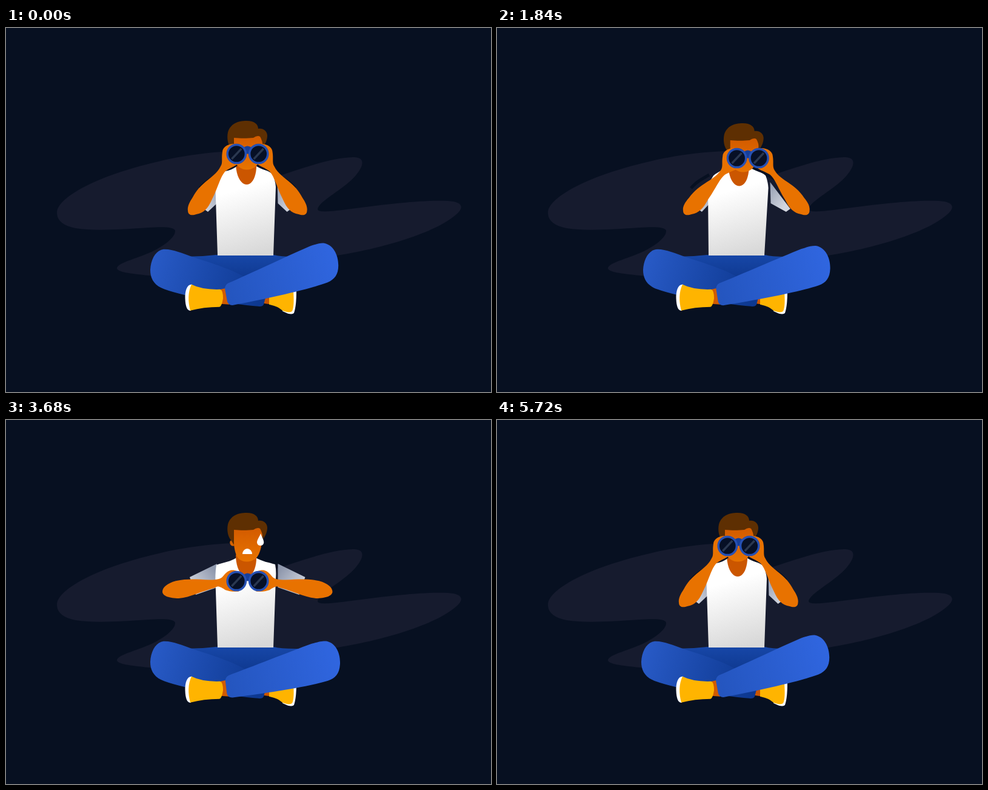
Recreate the animation shown at these times as an HTML page. Size 800 by 600 pixels, loop 5760 ms.

```html
<!DOCTYPE html>
<html lang="en">
<head>
<meta charset="utf-8">
<title>Lookout</title>
<style>
html, body { margin: 0; width: 100%; height: 100%; overflow: hidden; background: #071021; }
svg { display: block; width: 100vw; height: 100vh; }
</style>
</head>
<body>
<svg viewBox="0 0 800 600">
  <defs>
    <linearGradient id="cloth" x1=".4" y1="0" x2=".6" y2="1">
      <stop offset=".25" stop-color="#fff"/><stop offset="1" stop-color="#d8d8d8"/>
    </linearGradient>
    <linearGradient id="cuff" gradientUnits="userSpaceOnUse" x1="346" y1="250" x2="310" y2="280">
      <stop offset="0" stop-color="#8f98ad"/><stop offset="1" stop-color="#d3d7e0"/>
    </linearGradient>
    <linearGradient id="face" x1="0" y1="0" x2="0" y2="1">
      <stop offset="0" stop-color="#d25a00"/><stop offset="1" stop-color="#e87400"/>
    </linearGradient>
    <linearGradient id="hips" x1="0" y1="0" x2="0" y2="1">
      <stop offset="0" stop-color="#1747a8"/><stop offset="1" stop-color="#0c3488"/>
    </linearGradient>
    <linearGradient id="legL" gradientUnits="userSpaceOnUse" x1="240" y1="390" x2="420" y2="440">
      <stop offset="0" stop-color="#285ac6"/><stop offset="1" stop-color="#0d3890"/>
    </linearGradient>
    <linearGradient id="legR" gradientUnits="userSpaceOnUse" x1="362" y1="440" x2="548" y2="375">
      <stop offset="0" stop-color="#2455be"/><stop offset="1" stop-color="#3066e0"/>
    </linearGradient>
    <g id="lens">
      <circle r="15.1" fill="#071026" stroke="#2650b3" stroke-width="3.5"/>
      <path d="M-8 8.5L8 -8.5" stroke="#2b3850" stroke-width="3.4"/>
    </g>
  </defs>

  <path fill="#161b2e" d="M84 304C84 282 142 244 260 218C300 209 345 204 375 203C402 206 395 262 440 247C490 231 535 214 572 213C590 212 592 223 580 239C562 264 515 285 514 299C515 305 540 302 570 298C630 290 690 283 728 285C752 286 757 295 743 307C710 337 620 364 540 376C460 390 330 420 236 408C205 405 183 402 183 396C184 386 220 380 248 365C268 354 280 342 279 334C277 327 255 328 235 329C190 332 145 335 115 330C95 326 84 318 84 304Z"/>

  <g transform="translate(0 .8)">
    <path fill="#c95500" d="M423 445L438 442L438 455L424 453Z"/>
    <path fill="#fff" d="M470 434L479 432C479 448 478 460 475 469Q473 472 465 470L456 466Z"/>
    <path fill="#ffb400" d="M434 443L474 433C475 448 475 460 472 466Q468 470 456 465C448 458 442 457 434 455Z"/>
    <path fill="url(#hips)" d="M300 376Q325 376 349 373L441 373Q455 377 490 376L430 425L330 400Z"/>
  </g>
  <path id="sleeveL" fill="url(#cuff)"/>
  <g class="mirror"><path id="sleeveR" fill="url(#cuff)"/></g>
  <path id="shirt" fill="url(#cloth)"/>
  <path id="neck" fill="#cb5600" d="M379 222L413 222C414 243 407 258 397 258C387 258 379 243 379 222Z"/>

  <g id="head">
    <path fill="#d66300" d="M376 198C370 197 368 201 370 205Q372 209 377 207Z"/>
    <path fill="url(#face)" d="M374 176L423 176C424 202 420 222 411 229Q397 238 384 229C377 222 375 205 374 176Z"/>
    <path fill="#5e2f02" d="M376 206L371 198C366 192 364 182 366 172C370 158 382 153 397 153C410 153 416 159 416 166C424 165 430 169 431 177C431 185 428 190 424 197Q423 185 419 179Q415 176 408 181C398 182 386 182 376 181Z"/>
    <path id="mouth" fill="#fff" d="M390 221A8 9 0 0 1 406 221Z"/>
    <path id="drop" fill="#fff" d="M420 187C422 193 425.3 197 425.3 202A5.7 5.7 0 0 1 414 202C414 197 418 193 420 187Z"/>
  </g>

  <g transform="translate(0 .8)">
    <path id="legLeft" fill="url(#legL)" d="M262 364C276 364 292 371 306 376C340 387 375 398 396 411L428 444L425 455Q423 459 416 458C370 454 295 442 262 430C244 424 238 412 238 398C239 379 248 364 262 364Z"/>
    <path fill="#d05b00" d="M354 430L368 427L368 455L354 454Z"/>
    <path fill="#fff" d="M307 422C299 421 295 432 295.5 445C296 459 299 466 305 465Z"/>
    <path fill="#ffb400" d="M306 422Q324 431 353 430Q358 431 358 445Q356 458 352 459Q326 459 304 465C300 450 300 434 306 422Z"/>
    <path id="legRight" fill="url(#legR)" d="M361 429Q361 423 366 420C400 405 465 374 499 359C510 355 516 353 523 353C539 355 548 372 548 390C548 405 542 413 530 418C492 432 420 447 375 456Q367 457 365 450Z"/>
  </g>

  <g class="shade" fill="none" stroke="#071021">
    <path id="collar" stroke-width="2.4" d="M360 235Q373 233 381 226M436 235Q424 233 414 227"/>
    <path id="underarm" stroke-width="5" d="M320 264C328 254 338 249 350 242"/>
    <g class="mirror"><use href="#underarm"/></g>
  </g>
  <path id="armL" fill="#e87200"/>
  <g class="mirror"><path id="armR" fill="#e87200"/></g>
  <g id="glasses">
    <path fill="#173f9a" d="M392 197Q398 192 405 197L404 206Q398 209 393 206Z"/>
    <use href="#lens" x="380.3" y="207.5"/>
    <use href="#lens" x="416.7" y="207.5"/>
  </g>
</svg>

<script>
const LOOP = 5760, STEP = 40, TAP = 240;
const $ = id => document.getElementById(id);
const set = (id, name, value) => $(id).setAttribute(name, value);
const clamp = v => Math.max(0, Math.min(1, v));
const mix = (a, b, k) => a + (b - a) * k;
const ramp = (t, a, b) => { const u = clamp((t - a) / (b - a)); return u * u * (3 - 2 * u); };
const wave = (t, period) => Math.cos(2 * Math.PI * t / period);

const ARM_UP = "M376 191C364 191 357 198 357 204C355 215 358 222 354 228C345 247 322 252 308 279C302 288 299 295 300 301C300 308 306 310 314 307C326 305 333 298 340 282C350 262 354 244 362 236C370 230 378 228 382 224Z";
const ARM_DOWN = "M382 248C372 244 366 246 358 256C354 261 348 262 335 262C318 262 300 260 280 265C266 269 258 276 258 283C258 290 270 294 285 294C305 292 320 283 345 276C350 272 354 274 362 279C368 281 376 282 384 281Z";
const SLEEVE_UP = "M349 254L326 298L333 303L348 289Z";
const SLEEVE_DOWN = "M348 237L303 259L313 288L348 276Z";
const SHIRT_UP = "M380 227C372 231 362 234 354 241Q346 253 345.5 266L349 375L441 375L445 262Q444 250 440 241C432 234 422 233 412 227Z";
const SHIRT_DOWN = "M380 227C372 233 358 235 347 239Q345 250 345.5 266L349 375L441 375L445 262Q446 248 444 238C434 235 422 233 412 227Z";

const PAIR = /(-?[\d.]+) (-?[\d.]+)/g;

// Blends two paths of equal structure, then shifts each point.
function morph(from, to, k, shift) {
  const ends = [...to.matchAll(PAIR)];
  let i = 0;
  return from.replace(PAIR, (_, x, y) => {
    const end = ends[i++], [dx, dy] = shift(+x, +y);
    return `${mix(+x, +end[1], k) + dx} ${mix(+y, +end[2], k) + dy}`;
  });
}

function drawArm(side, lean, pose, lift) {
  const elbow = lean * (lean < 0 ? 19 : 7);
  const low = Math.abs(lean) * 7;
  set("arm" + side, "d", morph(ARM_UP, ARM_DOWN, pose, (x, y) => {
    const w = clamp((290 - y) / 65);
    return [mix(elbow, lean * 15.3, w), low * w + lift * w];
  }));
  set("sleeve" + side, "d", morph(SLEEVE_UP, SLEEVE_DOWN, pose, x =>
    x < 340 ? [elbow * .7, 0] : [lean * 3, 0]));
}

function draw(t) {
  const lean = -ramp(t, 0, 400) + 2 * ramp(t, 1200, 1600) - ramp(t, 2080, 2400);
  const sink = Math.abs(lean);
  const pose = ramp(t, 3000, 3320) - ramp(t, 4800, 5160);
  const rise = ramp(t, 2440, 2960) - ramp(t, 3000, 3160);
  const bob = .75 * (1 + wave(t - 3680, 2240)) * pose;
  const lift = bob - 3 * rise;

  const tapping = t <= 3460 || t >= 5620;
  const down = tapping ? (1 - wave(t + 20, TAP)) / 2 : 1;
  set("legRight", "transform", `rotate(${3.8 * down} 365 440)`);
  set("legLeft", "transform", lean < 0 ? `rotate(${lean} 420 450)` : `translate(${3 * lean} 0)`);

  set("shirt", "d", morph(SHIRT_UP, SHIRT_DOWN, pose, (x, y) => {
    const w = clamp((375 - y) / 140);
    return [3.2 * lean * w, 2.3 * sink * w];
  }));
  set("neck", "transform", `translate(${2.5 * lean} ${2.5 * sink})`);
  set("head", "transform", `translate(${8.7 * lean} ${4 * sink})`);

  const gape = ramp(t, 3080, 3280) - ramp(t, 4840, 5000);
  set("mouth", "transform", `translate(398 221) scale(${gape}) translate(-398 -221)`);
  const sweat = ramp(t, 3320, 3480) - ramp(t, 4840, 4960);
  const slide = 6.5 * ramp(t, 3680, 4200);
  set("drop", "transform", `translate(420 ${187 + slide}) scale(${sweat}) translate(-420 -187)`);

  drawArm("L", lean, pose, lift);
  drawArm("R", -lean, pose, lift);
  document.querySelector(".shade").setAttribute("opacity", clamp(1 - 5 * pose));
  set("collar", "transform", `translate(${8 * lean} ${4 * sink})`);
  set("glasses", "transform", `translate(${15.3 * lean} ${7 * sink + 56.5 * pose + lift})`);
}

document.querySelectorAll(".mirror").forEach(g =>
  g.setAttribute("transform", "translate(796.5 0) scale(-1 1)"));

const start = performance.now();
function tick() {
  const t = (performance.now() - start) % LOOP;
  draw(Math.floor(t / STEP) * STEP);
  requestAnimationFrame(tick);
}
tick();
</script>
</body>
</html>
```
